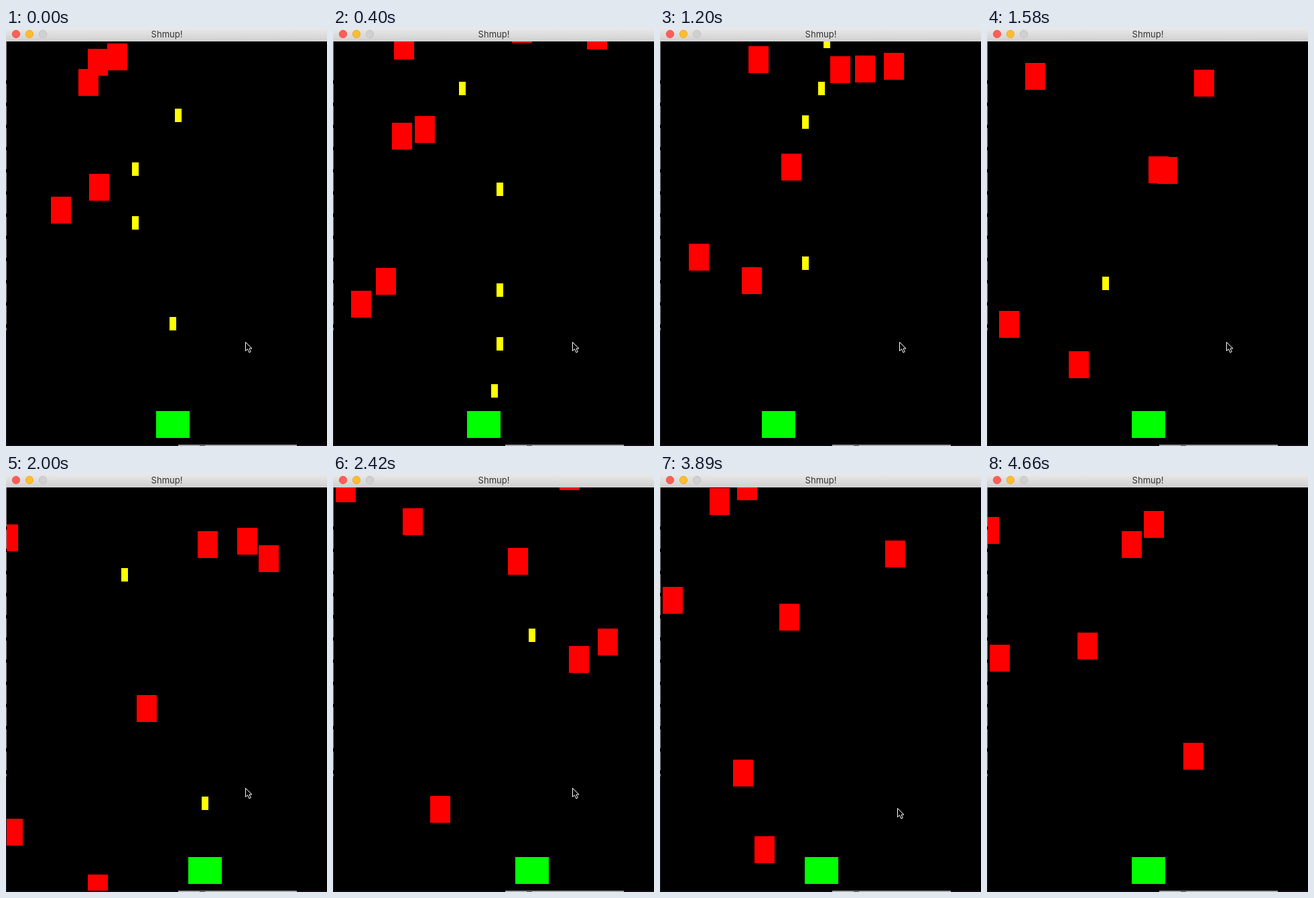
An HTML page with a canvas that plays this animation: 479x622 px, repeating every 4.76 s.

```html
<!DOCTYPE html>
<html lang="en">
<head>
<meta charset="utf-8">
<title>Shmup!</title>
<style>
html, body { margin: 0; width: 100%; height: 100%; overflow: hidden; background: #000; }
canvas { display: block; }
</style>
</head>
<body>
<canvas id="stage" width="479" height="622"></canvas>
<script>
const ctx = document.getElementById('stage').getContext('2d');
const LOOP = 4760, FIRST = -42, LAST = 264;
const clamp = (v, lo, hi) => Math.min(hi, Math.max(lo, v));

// Input: ticks at which the player heads for a new x, and ticks of shots
const goals = new Map([[-42, 168], [-24, 224], [18, 192], [56, 152], [83, 272], [150, 216]]);
const shots = new Set([-42, -34, -26, -11, 4, 12, 19, 24, 45, 73, 95, 107]);

// Enemies fly straight: x and y at tick 0, then speed per tick
let mobs = [
  [122, 31, 0, 5], [151, 23, 1, 3], [108, 61, -1, 4], [124, 217, -3, 7],
  [67, 251, -2, 7], [327, -38, -3, 1], [399, -28, -1, 1], [51, -73, 2, 4],
  [421, -349, -2, 6], [254, -348, 0, 6], [119, -598, 2, 6], [490, -572, -1, 6],
  [4, -274, 0, 2], [752, -292, -3, 2], [380, -363, -2, 3], [772, -1122, -3, 7],
  [362, -1008, -1, 7], [59, -1073, 2, 6], [557, -1448, -1, 7], [516, -200, -2, 1],
  [-327, -443, 2, 2], [498, -473, -1, 2]
];

// Play the game once and keep every tick from 0 on
const states = [];
let player = 232, goal = player, bullets = [];
for (let n = FIRST; n <= LAST; n++) {
  if (shots.has(n)) bullets.push({ x: player + 20, y: 550 });
  goal = goals.get(n) ?? goal;
  player += clamp(goal - player, -8, 8);
  for (const b of bullets) b.y -= 10;
  bullets = bullets.filter(b => b.y > 0);
  if (n < 0) continue;

  const hits = (b, [x, y, vx, vy]) => {
    const dx = b.x - x - vx * n, dy = b.y - y - vy * n;
    return dx > -10 && dx < 30 && dy > -20 && dy < 40;
  };
  const flying = bullets, alive = mobs;
  bullets = flying.filter(b => !alive.some(m => hits(b, m)));
  mobs = alive.filter(m => !flying.some(b => hits(b, m)));
  states.push({
    player,
    bullets: bullets.map(b => [b.x, b.y]),
    mobs: mobs.map(([x, y, vx, vy]) => [x + vx * n, y + vy * n])
  });
}

// Uneven refresh rate: [time in ms, tick, refreshes since the previous row]
const pace = [
  [0, 0], [570, 32, 8], [800, 45, 3], [1580, 90, 11],
  [1640, 93, 1], [3390, 193, 20], [3890, 221, 6], [4660, 264, 9]
];

function tickAt(t) {
  const i = pace.findIndex(row => row[0] > t);
  if (i < 0) return LAST;
  const [t0, n0] = pace[i - 1], [t1, n1, count] = pace[i];
  // the screen clock counts in steps of 10 ms
  const step = Math.floor((Math.floor(t / 10) * 10 + 9 - t0) / (t1 - t0) * count);
  return Math.round(n0 + (n1 - n0) * Math.min(step, count - 1) / count);
}

function rect(color, x, y, w, h) {
  ctx.fillStyle = color;
  ctx.fillRect(x, y, w, h);
}

function light(x, fill, edge) {
  ctx.beginPath();
  ctx.arc(x, 9, 5.7, 0, 7);
  ctx.fillStyle = fill;
  ctx.fill();
  ctx.strokeStyle = edge;
  ctx.lineWidth = 0.7;
  ctx.stroke();
}

function drawWindow() {
  rect('#000', 0, 0, 479, 622);

  const bar = ctx.createLinearGradient(0, 0, 0, 20);
  bar.addColorStop(0, '#e9e9e9');
  bar.addColorStop(1, '#d0d0d0');
  rect(bar, 0, 0, 479, 20);
  light(15, '#fc5f57', '#e2463f');
  light(35, '#fdbd2e', '#e1a116');
  light(55, '#d0d0d0', '#b9b9b9');
  ctx.fillStyle = '#333';
  ctx.font = '13px Inter, "Open Sans", sans-serif';
  ctx.textAlign = 'center';
  ctx.fillText('Shmup!', 240, 14);

  // slivers of the desktop around the window
  rect('#8c8c8c', 0, 20, 1, 430);
  rect('#1c1c30', 0, 450, 1, 170);
  for (let y = 78; y < 450; y += 33) rect('#000', 0, y, 1, 5);
  rect('#0b0b14', 0, 620, 257, 2);
  rect('#a3a3a3', 257, 620, 177, 2);
  rect('#333', 289, 621, 8, 1);
  rect('#140c16', 434, 620, 45, 2);
}

function drawCursor(n) {
  const down = clamp((n - 198) / 23, 0, 1), away = clamp((n - 226) / 24, 0, 1);
  ctx.save();
  ctx.translate(357.5 - 3 * down + 64 * away, 467.5 + 30 * down + 123 * away);
  const arrow = new Path2D('M0 0V13L3 10.2 5.3 15.3 7.7 14.3 5.5 9.5H9.5Z');
  ctx.fillStyle = '#000';
  ctx.fill(arrow);
  ctx.strokeStyle = '#fff';
  ctx.lineWidth = 1;
  ctx.stroke(arrow);
  ctx.restore();
}

function draw(t) {
  const n = tickAt(t), state = states[n];
  drawWindow();
  ctx.save();
  ctx.beginPath();
  ctx.rect(1, 20, 478, 600);
  ctx.clip();
  rect('#0f0', state.player, 570, 50, 40);
  for (const [x, y] of state.mobs) rect('#f00', x, y, 30, 40);
  for (const [x, y] of state.bullets) rect('#ff0', x, y, 10, 20);
  drawCursor(n);
  ctx.restore();
}

const start = performance.now();
function frame() {
  draw((performance.now() - start) % LOOP);
  requestAnimationFrame(frame);
}
frame();
</script>
</body>
</html>
```
